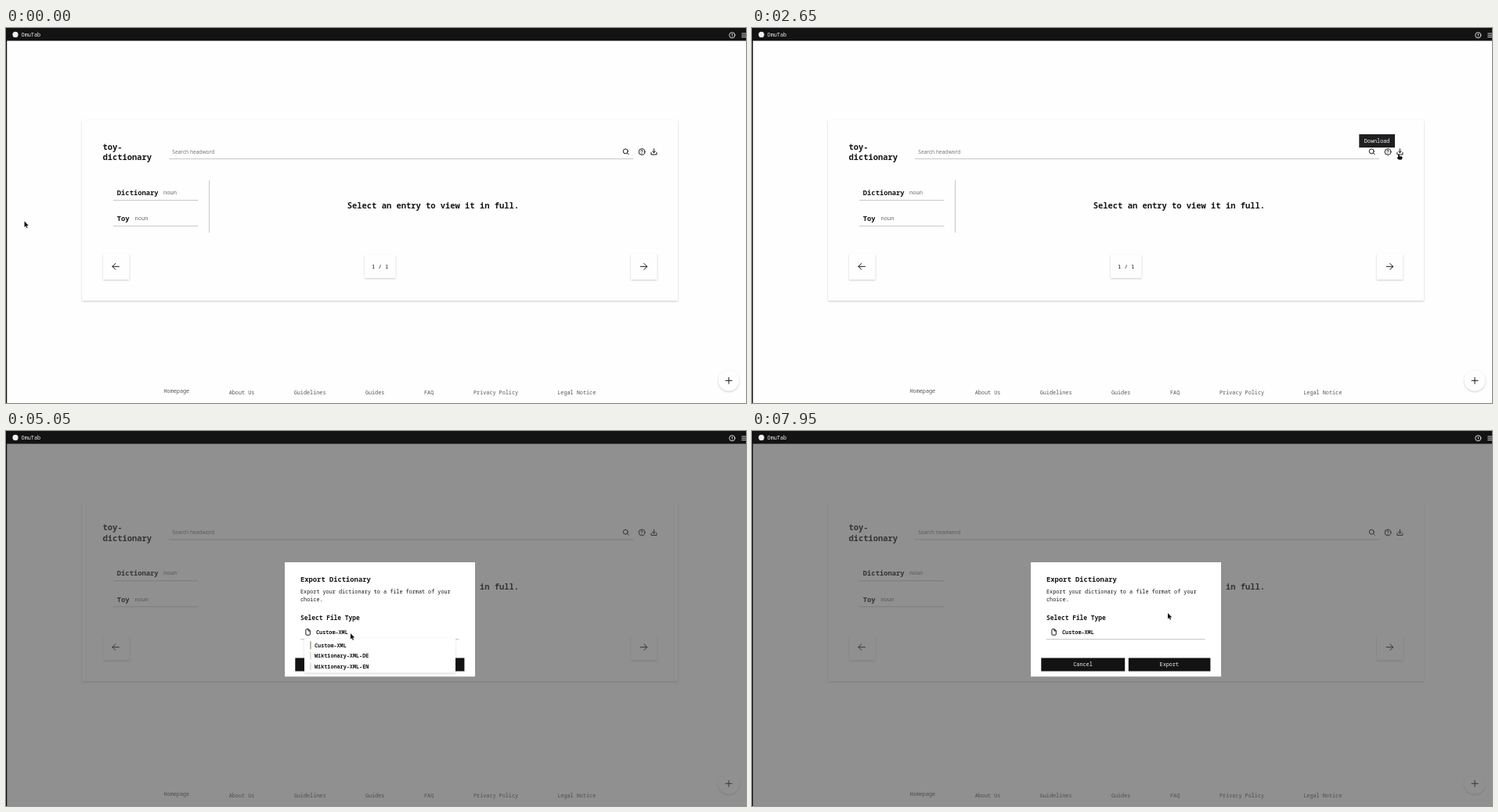
Recreate the animation shown at these times as an HTML page. Size 945x480 px, loop 8000 ms.

```html
<!DOCTYPE html>
<html lang="en">
<head>
<meta charset="utf-8">
<title>Dictionary export</title>
<style>
  html, body { margin: 0; width: 100%; height: 100%; overflow: hidden; background: #fefefe; }
  svg { display: block; width: 945px; height: 480px; }
  text { font-family: "Noto Sans Mono", "DejaVu Sans Mono", monospace; font-size: 6.8px; fill: #161616; white-space: pre; }
  .h1 { font-size: 10.45px; font-weight: 600; }
  .h2 { font-size: 8.8px; font-weight: 600; }
  .h3 { font-size: 7.9px; font-weight: 600; }
  .b { font-weight: 600; }
  .small { font-size: 7.1px; fill: #666; }
  .foot text { fill: #555; }
  .w { fill: #f4f4f4; }
  .hint { font-family: "Noto Sans", "Open Sans", sans-serif; font-size: 6.6px; font-weight: 500; fill: #777; }
  .icon { fill: none; stroke: #161616; stroke-width: 1; stroke-linecap: round; stroke-linejoin: round; }
  .rule { stroke: #c8c8c8; stroke-width: 1; }
  .card { fill: #fefefe; filter: drop-shadow(0 1.6px 1.3px rgba(0, 0, 0, .2)); }
</style>
</head>
<body>
<svg viewBox="0 0 945 480">
  <rect width="945" height="480" fill="#fefefe"/>

  <g id="page">
    <rect class="card" x="97" y="118" width="761" height="231"/>
    <text class="h1" x="123.5" y="156">toy-</text>
    <text class="h1" x="123.5" y="169.3">dictionary</text>
    <text class="hint" x="212.3" y="160.6">Search headword</text>
    <path class="rule" d="M208 167.5H801M137 220.5H245.5M137 253.5H245.5"/>
    <path class="rule" id="divider" d="M259.5 195V262"/>
    <g class="icon">
      <circle cx="791.2" cy="157.8" r="3"/>
      <path d="M793.5 160.1L795.2 161.8"/>
      <circle cx="812" cy="158.5" r="3.9"/>
      <path d="M810.7 157.5Q810.9 156.2 812.1 156.3Q813.4 156.6 813.2 157.7Q812.8 158.5 812 159M812 160.5V160.6" stroke-width=".85"/>
      <path d="M827.4 154.7V159.6M825.4 157.8L827.4 159.7L829.4 157.8M823.9 159.4V162H830.9V159.4"/>
    </g>
    <text class="h2" x="141.8" y="213.8">Dictionary</text>
    <text class="small" x="201" y="213">noun</text>
    <text class="h2" x="141.8" y="247.2">Toy</text>
    <text class="small" x="164.5" y="246.4">noun</text>
    <text class="h1" x="435.8" y="231.4">Select an entry to view it in full.</text>
    <rect class="card" x="124" y="289" width="33.5" height="33"/>
    <rect class="card" x="458" y="290" width="39.5" height="30"/>
    <rect class="card" x="798" y="289" width="33.5" height="33"/>
    <path class="icon" stroke-width="1.2" d="M144.4 305.3H136M139.8 301.4L135.9 305.3L139.8 309.2M810.2 305.3H818.6M814.8 301.4L818.7 305.3L814.8 309.2"/>
    <text x="467" y="307.8" style="font-size:7.1px">1 / 1</text>
    <g id="tip">
      <rect x="775.3" y="136" width="45.7" height="17" fill="#202022"/>
      <text class="w" x="781.8" y="147">Download</text>
    </g>
  </g>

  <g class="foot" id="foot"></g>
  <circle class="card" cx="923" cy="451.3" r="13.5"/>
  <path class="icon" stroke-width="1.2" d="M919 451.3H927M923 447.3V455.3"/>

  <g id="modal">
    <rect y="16" width="945" height="464" fill="#494949" fill-opacity=".6"/>
    <rect x="356" y="168" width="243" height="146.3" fill="#fff"/>
    <text class="h2" x="376" y="193.3">Export Dictionary</text>
    <text x="376" y="207.6">Export your dictionary to a file format of your</text>
    <text x="376" y="217.6">choice.</text>
    <text class="h3" x="376" y="242.4">Select File Type</text>
    <path class="icon" stroke-width=".9" d="M386 253.6H383.9Q382.9 253.6 382.9 254.6V260.2Q382.9 261.2 383.9 261.2H387.3Q388.3 261.2 388.3 260.2V255.9ZV255.9H388.3"/>
    <text class="b" x="396" y="259.6">Custom-XML</text>
    <path class="rule" d="M376 266.5H578.5"/>
    <rect x="369.3" y="290.5" width="106.9" height="17" fill="#131313"/>
    <rect x="480.8" y="290.5" width="104.6" height="17" fill="#131313"/>
    <text class="w" x="410.3" y="301.3">Cancel</text>
    <text class="w" x="520.6" y="301.3">Export</text>
    <g id="menu">
      <rect x="381" y="265.5" width="193" height="44" fill="#fff" style="filter:drop-shadow(0 1px 1px rgba(0,0,0,.18))"/>
    </g>
  </g>

  <rect width="945" height="16.4" fill="#131313"/>
  <rect width="1.2" height="480" fill="#0c0c0c"/>
  <circle cx="12" cy="8.4" r="3.6" fill="#f0f0f0"/>
  <text class="w" x="19.6" y="11">OmuTab</text>
  <g class="icon" style="stroke:#e8e8e8;stroke-width:.9">
    <circle cx="927.3" cy="9.2" r="3.6"/>
    <path d="M927.3 7.3V9.5M927.3 11V11.1M939.8 7H946M939.8 9.3H946M939.8 11.6H946"/>
  </g>

  <g id="cursor" fill="#111" stroke="#fff" stroke-width=".9" stroke-linejoin="round" paint-order="stroke">
    <path id="arrow" d="M0 0V7.6L1.7 6L2.9 8.7L4.1 8.2L2.9 5.6H5.3Z"/>
    <path id="hand" d="M-.9 .7Q0 -.5 .9 .7V2.9L3.9 3.5Q4.8 3.9 4.6 5.1L3.8 7.6H-.6L-2.3 4.9Q-2.1 3.8 -.9 4.6Z"/>
  </g>
</svg>

<script>
const LOOP = 8000, STEP = 50;
const $ = id => document.getElementById(id);

function add(parent, tag, attrs, label) {
  const el = document.createElementNS("http://www.w3.org/2000/svg", tag);
  for (const k in attrs) el.setAttribute(k, attrs[k]);
  if (label) el.textContent = label;
  parent.append(el);
}

[["Homepage", 201.5, 467.2], ["About Us", 284.7], ["Guidelines", 367.7], ["Guides", 458.9],
 ["FAQ", 534], ["Privacy Policy", 597], ["Legal Notice", 704.3]]
  .forEach(([label, x, y = 469.2]) => add($("foot"), "text", { x, y }, label));

["Custom-XML", "Wiktionary-XML-DE", "Wiktionary-XML-EN"].forEach((label, i) => {
  const y = 276.7 + i * 13.5;
  add($("menu"), "rect", { x: 388.4, y: y - 7.5, width: 1.1, height: 10, fill: i ? "#d2cbd0" : "#8d7d58" });
  add($("menu"), "text", { x: 394, y, class: "b" }, label);
});

const smooth = s => s * s * (3 - 2 * s);
const settle = s => 1 - (1 - s) ** 4;

// start, end, target x, y, easing, optional curve control point
const moves = [
  [950, 1800, 783, 170, smooth, 480, 100],
  [1800, 2650, 826, 161, settle],
  [3150, 4150, 440.5, 258, smooth],
  [5000, 5450, 425, 286, smooth],
  [5950, 6250, 425, 303, smooth],
  [6600, 7000, 428, 278, smooth],
  [7300, 7950, 531, 233, smooth, 520, 180]
];

function pointer(t) {
  let x = 23.5, y = 247.3;
  for (const [a, b, tx, ty, ease, cx = (x + tx) / 2, cy = (y + ty) / 2] of moves) {
    if (t <= a) break;
    const s = ease(Math.min(1, (t - a) / (b - a)));
    const mix = (p, c, q) => (1 - s) ** 2 * p + 2 * s * (1 - s) * c + s * s * q;
    x = mix(x, cx, tx);
    y = mix(y, cy, ty);
  }
  return [x, y];
}

const show = (id, on) => { $(id).style.display = on ? "" : "none"; };

function draw(now) {
  const t = Math.floor((now % LOOP) / STEP) * STEP;
  const [x, y] = pointer(t);
  const modal = t >= 3050;
  const menu = t >= 4500 && t < 7300;
  const hand = (t >= 2200 && !modal) || (menu && y > 268);

  $("page").setAttribute("transform", `translate(0 ${modal ? -28.6 : 0})`);
  show("modal", modal);
  show("divider", !modal);
  show("menu", menu);
  show("tip", t >= 2200 && t < 3200);
  show("hand", hand);
  show("arrow", !hand);
  $("cursor").setAttribute("transform", `translate(${x.toFixed(2)} ${y.toFixed(2)})`);
}

const begin = performance.now();
function tick() {
  draw(performance.now() - begin);
  requestAnimationFrame(tick);
}
tick();
</script>
</body>
</html>
```
